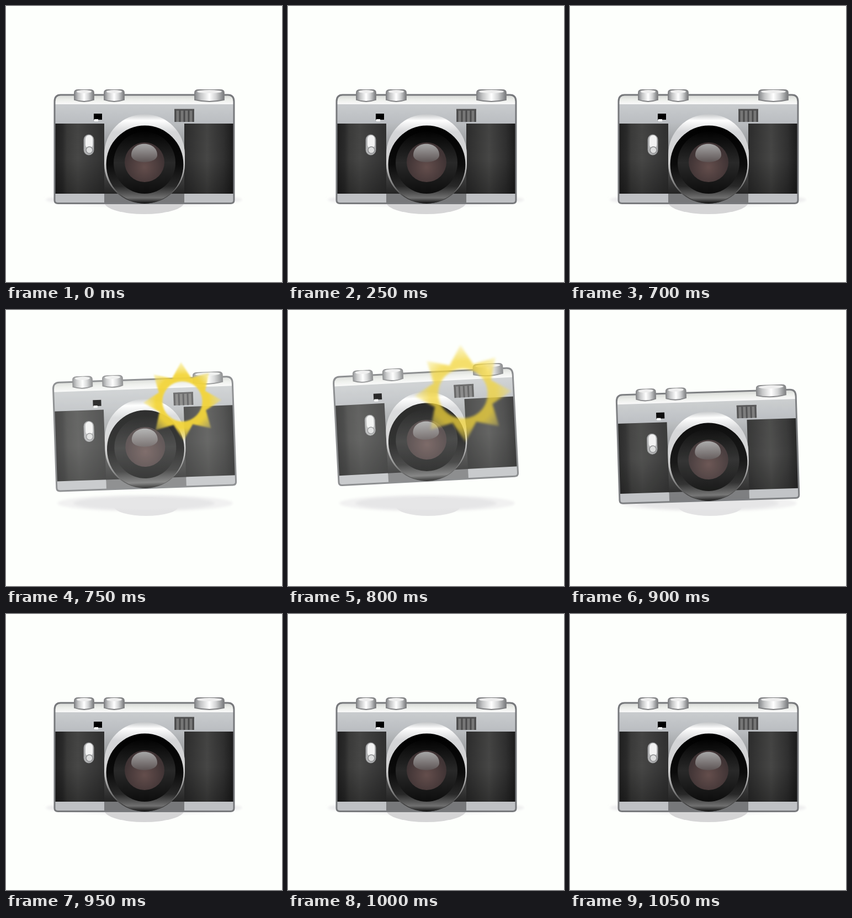
Animation, 500 px wide and 500 px high, one loop 1100 ms. Source, as an HTML page:

```html
<!DOCTYPE html>
<html lang="en">
<head>
<meta charset="utf-8">
<title>Camera flash</title>
<style>
html, body { margin: 0; height: 100%; overflow: hidden; background: #fdfffc; }
svg { display: block; width: 100vw; height: 100vh; }
</style>
</head>
<body>
<svg viewBox="0 0 500 500">
  <defs>
    <linearGradient id="lid" x2="0" y2="1">
      <stop stop-color="#d4d6d3"/><stop offset=".5" stop-color="#eceeea"/><stop offset="1" stop-color="#fafafa"/>
    </linearGradient>
    <linearGradient id="silver" x2="0" y2="1">
      <stop stop-color="#c9ccce"/><stop offset="1" stop-color="#b9bcc0"/>
    </linearGradient>
    <linearGradient id="leather">
      <stop stop-color="#1f1f1f"/><stop offset=".045" stop-color="#2b2b2b"/><stop offset=".07" stop-color="#3c3c3b"/>
      <stop offset=".13" stop-color="#474746"/><stop offset=".28" stop-color="#313131"/><stop offset=".72" stop-color="#2d2d2d"/>
      <stop offset=".85" stop-color="#464645"/><stop offset=".94" stop-color="#313131"/><stop offset="1" stop-color="#1b1b1b"/>
    </linearGradient>
    <linearGradient id="fade" x2="0" y2="1">
      <stop stop-opacity=".05"/><stop offset=".5" stop-opacity="0"/><stop offset="1" stop-opacity=".3"/>
    </linearGradient>
    <linearGradient id="panel" x2="0" y2="1">
      <stop stop-color="#babdc0"/><stop offset=".3" stop-color="#9a9c9e"/>
      <stop offset=".65" stop-color="#4c4c4c"/><stop offset="1" stop-color="#232323"/>
    </linearGradient>
    <linearGradient id="ring" x2="0" y2="1">
      <stop stop-color="#c4c6c8"/><stop offset=".07" stop-color="#fff"/><stop offset=".2" stop-color="#d5d6d8"/>
      <stop offset=".55" stop-color="#d0d0d0"/><stop offset=".8" stop-color="#777"/><stop offset="1" stop-color="#222"/>
    </linearGradient>
    <linearGradient id="barrel" x2="0" y2="1">
      <stop stop-color="#000"/><stop offset=".5" stop-color="#0b0b0b"/>
      <stop offset=".78" stop-color="#282828"/><stop offset=".93" stop-color="#707070"/><stop offset="1" stop-color="#111"/>
    </linearGradient>
    <linearGradient id="inner" x2="0" y2="1">
      <stop stop-color="#030303"/><stop offset=".5" stop-color="#292929"/><stop offset="1" stop-color="#0d0d0d"/>
    </linearGradient>
    <radialGradient id="glass" cy=".62">
      <stop stop-color="#644e4c"/><stop offset="1" stop-color="#403435"/>
    </radialGradient>
    <linearGradient id="shine" x2="0" y2="1">
      <stop stop-color="#a6a6a6"/><stop offset="1" stop-color="#5e5555"/>
    </linearGradient>
    <linearGradient id="knob">
      <stop stop-color="#85878a"/><stop offset=".2" stop-color="#c4c5c6"/><stop offset=".5" stop-color="#fff"/>
      <stop offset=".72" stop-color="#d2d3d4"/><stop offset="1" stop-color="#77797b"/>
    </linearGradient>
    <radialGradient id="burst" gradientUnits="userSpaceOnUse" cx="0" cy="0" r="1">
      <stop offset=".68" stop-color="#f3d53a"/><stop offset="1" stop-color="#f6e05a" stop-opacity=".4"/>
    </radialGradient>
    <filter id="soft" x="-20%" y="-50%" width="140%" height="200%"><feGaussianBlur stdDeviation="2"/></filter>
    <filter id="haze"><feGaussianBlur stdDeviation=".025"/></filter>
    <clipPath id="shell"><path id="outline" d="M88 173Q88 161 99 161H402Q413 161 413 173V352Q413 357.5 407 357.5H94Q88 357.5 88 352Z"/></clipPath>
  </defs>

  <g id="ground">
    <ellipse cx="250" cy="351" rx="178" ry="12" fill="#eeeeef" filter="url(#soft)"/>
    <ellipse cx="250.5" cy="356" rx="72" ry="21" fill="#d5d5d6"/>
  </g>
  <g id="air">
    <ellipse cx="252" cy="350" rx="159" ry="15" fill="#f1f1f1" filter="url(#soft)"/>
    <ellipse cx="254" cy="356" rx="58" ry="17" fill="#e3e3e4"/>
    <ellipse cx="250" cy="350" rx="128" ry="12" fill="#e6e6e7" filter="url(#soft)"/>
  </g>

  <g id="camera">
    <g clip-path="url(#shell)">
      <path fill="url(#lid)" d="M88 161H413V178H88Z"/>
      <path fill="url(#silver)" d="M88 178H413V214H88Z"/>
      <path fill="url(#leather)" d="M88 213H413V341H88Z"/>
      <path fill="url(#fade)" d="M88 213H413V341H88Z"/>
      <path fill="#bfc1c4" d="M88 340H413V358H88Z"/>
      <path fill="url(#panel)" d="M178 212H323V341H178Z"/>
      <path fill="#77787a" d="M178 340H323V358H178Z"/>
    </g>
    <use href="#outline" fill="none" stroke="#77797c" stroke-width="3"/>
    <g id="knobs" fill="url(#knob)" stroke="#808183" stroke-width="1.8"></g>

    <path d="M159 195h15v11h-15z"/>
    <path fill="#fff" d="M160 205h7v4h-7z"/>
    <path fill="#777777" d="M305 187h36v23h-36z"/>
    <path stroke="#4a4a4b" stroke-width="3" d="M307 187v23m8-23v23m8-23v23m8-23v23m8-23v23"/>
    <path stroke="#505051" stroke-width="3" d="M305 188h36"/>
    <rect x="141" y="233" width="18" height="37" rx="9" fill="#b4b5b6" stroke="#909193"/>
    <rect x="144" y="234" width="13" height="24" rx="6.5" fill="#f2f2f2"/>
    <circle cx="151" cy="261" r="6" fill="#dcdddd" stroke="#8b8c8e" stroke-width="1.5"/>

    <path d="M178 269A73 73 0 0 1 324 269V287A73 71 0 0 1 178 287Z" fill="url(#ring)"/>
    <ellipse cx="251.5" cy="287" rx="70" ry="70.5" fill="url(#barrel)"/>
    <circle cx="251" cy="284" r="56" fill="url(#inner)"/>
    <circle cx="251" cy="283" r="36" fill="url(#glass)"/>
    <path d="M227 270C227 243 274 243 274 270C274 287 227 287 227 270Z" fill="url(#shine)"/>
  </g>

  <g id="flash">
    <path id="rays" fill="url(#burst)" fill-rule="evenodd" filter="url(#haze)"/>
  </g>
</svg>
<script>
const el = id => document.getElementById(id);
const LOOP = 1100, STEP = 50, START = 750;
const REST = { x: 0, y: 0, turn: 0, alpha: 1, size: 0, glow: 0 };
const HOP = [
  { x: 0.5, y: -35, turn: -2, alpha: .81, size: 71, glow: .95 },
  { x: -1, y: -48, turn: -3, alpha: .83, size: 88, glow: .75 },
  { x: -4, y: -31, turn: -3.8, alpha: .87, size: 24, glow: .85 },
  { x: -1, y: -12, turn: -1.8, alpha: .94, size: 0, glow: 0 }
];

// Eight-pointed star around a round hole, in unit radius
const point = (r, i) => {
  const a = i * Math.PI / 8;
  return `${r * Math.sin(a)} ${-r * Math.cos(a)}`;
};
const star = Array.from({ length: 16 }, (_, i) => point(i % 2 ? .64 : 1, i));
el('rays').setAttribute('d', `M${star.join('L')}ZM-.51 0a.51 .51 0 1 0 1.02 0a.51 .51 0 1 0-1.02 0Z`);

const knob = (x, w) => `<path d="M${x} 170V157Q${x} 152 ${x + 7} 152H${x + w - 7}Q${x + w} 152 ${x + w} 157V170Q${x + w / 2} 176 ${x} 170Z"/>
  <ellipse cx="${x + w / 2}" cy="155" rx="${w / 2 - 4}" ry="3" fill="#eeeeee" stroke="none"/>`;
el('knobs').innerHTML = knob(124, 35) + knob(178, 36) + knob(342, 53);

function draw(now) {
  const t = now % LOOP;
  const pose = HOP[Math.floor((t - START) / STEP)] || REST;
  const { x, y, turn, alpha, size, glow } = pose;
  const place = `translate(${x} ${y}) rotate(${turn} 250 260)`;
  el('camera').setAttribute('transform', place);
  el('camera').setAttribute('opacity', alpha);
  el('ground').setAttribute('opacity', y ? 0 : 1);
  el('air').setAttribute('opacity', y ? 1 : 0);
  el('flash').setAttribute('transform', `${place} translate(321 203) scale(${size})`);
  el('flash').setAttribute('opacity', glow);
  requestAnimationFrame(draw);
}
requestAnimationFrame(draw);
</script>
</body>
</html>
```
